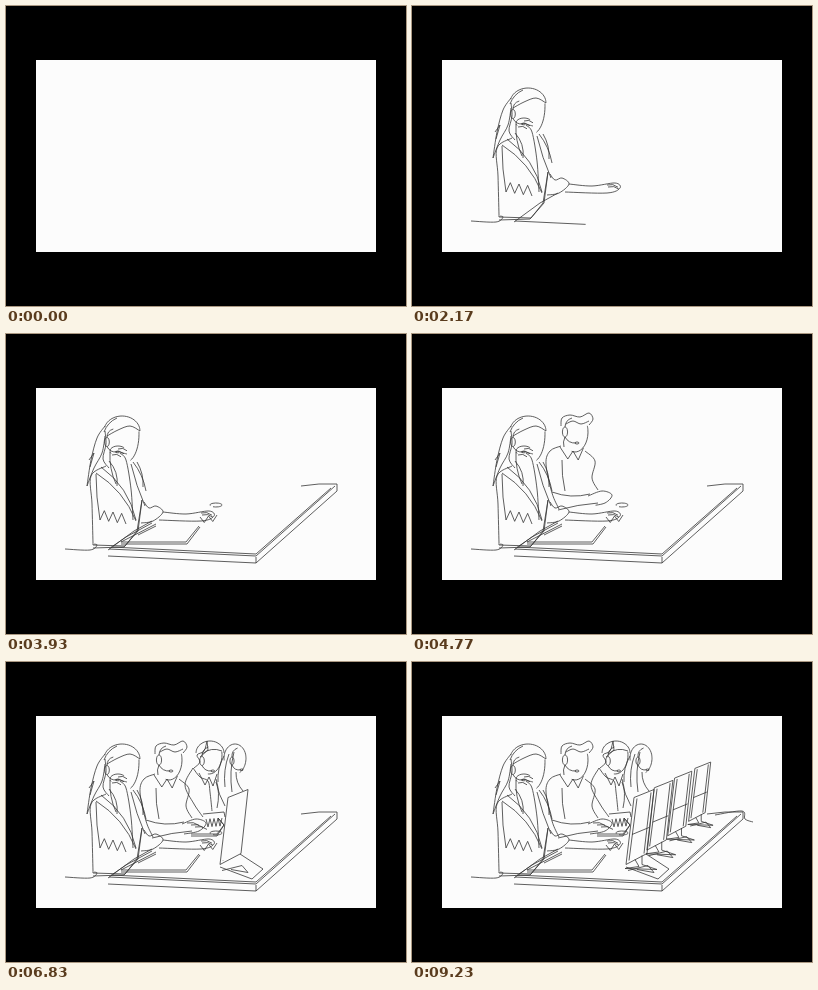
An HTML page for the animation above (9.93 s loop, 400x300 px).

```html
<!DOCTYPE html>
<html lang="en">
<head>
<meta charset="utf-8">
<title>One-line call centre</title>
<style>
  html, body { margin: 0; width: 100%; height: 100%; overflow: hidden; background: #000; }
  svg { display: block; width: 400px; height: 300px; }
  path { fill: none; stroke: #363636; stroke-width: .8; stroke-linejoin: round; }
</style>
</head>
<body>
<svg viewBox="0 0 400 300">
  <rect x="30" y="54" width="340" height="192" fill="#fcfcfc"/>
  <g id="ink"></g>
</svg>
<script>
const LOOP = 9930;
const ink = document.getElementById('ink');

const range = (n, f) => Array.from({ length: n }, (_, i) => f(i));
const pairs = n => range(n.length / 2, i => [n[2 * i], n[2 * i + 1]]);
const poly = (...n) => 'M' + pairs(n).join('L');

// Smooth curve through a few key points
function curve(...n) {
  const p = pairs(n);
  let d = 'M' + p[0];
  for (let i = 0; i < p.length - 1; i++) {
    const a = p[i - 1] || p[i], b = p[i], c = p[i + 1], e = p[i + 2] || c;
    const c1 = b.map((v, k) => v + (c[k] - a[k]) / 6);
    const c2 = c.map((v, k) => v - (e[k] - b[k]) / 6);
    d += `C${c1} ${c2} ${c}`;
  }
  return d;
}

// Single bow from one point to another, pushed sideways by b
const bend = (x1, y1, x2, y2, b) => {
  const len = Math.hypot(x2 - x1, y2 - y1);
  const mx = (x1 + x2) / 2 + 2 * b * (y2 - y1) / len;
  const my = (y1 + y2) / 2 - 2 * b * (x2 - x1) / len;
  return `M${x1},${y1}Q${mx},${my} ${x2},${y2}`;
};

// Part of an ellipse, in degrees clockwise from the right
const arc = (x, y, rx, ry, from, to) => curve(...range(13, i => {
  const a = (from + (to - from) * i / 12) * Math.PI / 180;
  return [x + rx * Math.cos(a), y + ry * Math.sin(a)];
}).flat());

const zigzag = (x1, y1, x2, y2, teeth, h) => poly(...range(2 * teeth + 1, i => {
  const k = i / (2 * teeth);
  return [x1 + (x2 - x1) * k, y1 + (y2 - y1) * k + (i % 2) * h];
}).flat());

// Ear cup, headband and microphone
const headset = (x, y, s, lift) => [
  arc(x, y, 2.6 * s, 5 * s, -90, 270),
  bend(x, y - 5 * s, x + 7 * s, y - lift, 2),
  bend(x, y + 5 * s, x + 11 * s, y + 11 * s, -2),
  arc(x + 12 * s, y + 11 * s, 2 * s, s, 0, 360)
];

const collar = (x, y, w) =>
  poly(x - w, y - 4, x - w * .4, y + 8, x, y, x + w * .4, y + 9, x + w * .8, y - 3);

const fingers = (x, y, n, dx, dy, len) =>
  range(n, i => bend(x + dx * i, y + dy * i, x + dx * i + len, y + dy * i + len * .2, 1.5));

// Draws the lines one after another at an even pen speed between two times
function draw(from, to, ...lines) {
  const paths = lines.flat().map(d => {
    const el = document.createElementNS('http://www.w3.org/2000/svg', 'path');
    el.setAttribute('d', d);
    ink.append(el);
    return el;
  });
  const lengths = paths.map(el => el.getTotalLength());
  const rate = (to - from) / lengths.reduce((a, b) => a + b);
  let t = from;
  paths.forEach((el, i) => {
    const end = t + lengths[i] * rate;
    const hidden = lengths[i] + 1;
    el.style.strokeDasharray = `${hidden} ${hidden * 2}`;
    el.animate([
      { strokeDashoffset: hidden, offset: 0 },
      { strokeDashoffset: hidden, offset: t / LOOP },
      { strokeDashoffset: 0, offset: end / LOOP },
      { strokeDashoffset: 0, offset: 1 }
    ], { duration: LOOP, iterations: Infinity });
    t = end;
  });
}

// First operator: vest, then hair, then raised arm
draw(30, 620,
  curve(59, 215, 84, 216, 91, 211, 86, 210),
  curve(87, 209, 86, 170, 85, 142, 100, 132),
  range(2, i => poly(87, 211 + 3 * i, 119 - i, 212 + i, 131 + i, 197, 136, 166)),
  bend(90, 139, 130, 187, 5),
  bend(90, 140, 94, 186, -1),
  zigzag(94, 186, 120, 190, 3, -10),
  bend(95, 133, 130, 186, 6));
draw(620, 1000,
  curve(103, 134, 97, 125, 100, 110, 99, 97),
  curve(99, 92, 91, 104, 85, 126, 81, 152),
  curve(81, 152, 88, 134, 96, 119, 99, 102),
  poly(83, 126, 88, 119, 84, 133),
  arc(116, 97, 18, 15, 195, 360),
  curve(134, 97, 124, 92, 112, 96, 101, 102),
  bend(98, 98, 111, 84, 2));
draw(1000, 1350,
  bend(103, 127, 111, 152, 3),
  curve(127, 186, 125, 155, 120, 126, 114, 119, 121, 120));

// Face, hand at the ear, far sleeve and forearm
draw(1370, 2000,
  arc(120, 100, 13, 28, -5, 70),
  headset(101, 108, .9, 13),
  arc(112, 117, 8, 5, 150, 320),
  fingers(106, 121, 3, 3, -3, 9),
  bend(104, 118, 110, 150, -2),
  range(2, i => bend(127 + 4 * i, 128, 140 - 3 * i, 157 - 4 * i, 2)),
  bend(125, 130, 139, 172, -1),
  curve(138, 168, 143, 174, 150, 172, 157, 178, 147, 187, 135, 189),
  curve(157, 178, 180, 180, 203, 177, 208, 182, 195, 187, 153, 186),
  fingers(195, 179, 2, 1, 2, 11));

// Desk: a slab given by three corners, with parallel rims
const rim = (inset, drop) =>
  poly(102 + inset, 216 - inset + drop, 250, 223 - inset + drop, 331 - 2 * inset, 151 + inset + drop);
draw(2030, 2660, poly(146, 187, 128, 197, 102, 216), rim(1, 0), rim(3, 0));
draw(2660, 3220,
  poly(107, 212, 120, 203, 146, 189),
  rim(0, 6),
  poly(250, 223, 250, 229),
  poly(331, 157, 331, 150),
  bend(331, 150, 295, 152, -1));
draw(3220, 3930,
  poly(150, 190, 115, 208, 180, 208, 193, 192),
  poly(115, 210, 181, 210, 194, 193),
  poly(132, 201, 150, 192),
  zigzag(194, 183, 211, 181, 2, 6),
  arc(210, 171, 6, 2, 160, 480));

// Second operator
draw(4030, 4480,
  curve(147, 175, 140, 159, 134, 130, 138, 117, 149, 112),
  collar(161, 117, 13),
  bend(153, 103, 152, 113, -1),
  curve(149, 92, 150, 84, 158, 81, 168, 83, 177, 79, 181, 85, 177, 91),
  curve(154, 90, 161, 87, 169, 90, 177, 87),
  arc(163, 98, 13, 20, -18, 105));
draw(4480, 5000,
  headset(153, 98, 1, 14),
  bend(150, 126, 153, 157, -1),
  curve(173, 117, 183, 127, 180, 144, 186, 156),
  bend(140, 158, 178, 160, -3),
  bend(146, 176, 186, 169, 1),
  curve(176, 162, 190, 157, 200, 161, 193, 169, 178, 172),
  fingers(181, 161, 3, 4, 2, 12),
  zigzag(200, 157, 216, 156, 4, 8),
  range(2, i => poly(185, 172 + 2 * i, 211, 172 + 2 * i, 218, 163, 212, 156)));

// Third operator
draw(5030, 5570,
  poly(197, 152, 218, 150, 219, 155),
  curve(197, 155, 188, 142, 179, 123, 187, 106),
  curve(187, 106, 194, 115, 202, 119, 204, 130, 206, 149),
  curve(188, 106, 194, 100, 191, 93, 198, 89, 201, 79),
  poly(201, 79, 202, 88, 194, 95));
draw(5570, 6020,
  arc(204, 91, 14, 12, 180, 360),
  bend(196, 92, 216, 89, 3),
  arc(203, 93, 13, 19, -10, 95),
  headset(196, 99, .9, 14),
  collar(203, 115, 10),
  bend(210, 117, 211, 146, 2));

// Fourth operator
draw(6020, 6400,
  arc(229, 96, 11, 14, 170, 360),
  arc(229, 96, 11, 16, 0, 65),
  range(3, i => bend(218 + 5 * i, 94 - 2 * i, 212 + 7 * i, 120 + 5 * i, -2)),
  headset(226, 99, .8, 13),
  bend(230, 110, 237, 129, -2),
  bend(210, 120, 219, 144, -1));

// Screens along the desk, each a smaller copy of the one before
function screen(i) {
  const x = 222 + 20.3 * i, y = 135.5 - 9.7 * i, s = 1 - .07 * i;
  const at = (...n) => poly(...n.map((v, k) => k % 2 ? y + v * s : x + v * s));
  return {
    panel: at(-8, 67, 0, 0, 20, -8, 13, 56, -8, 67),
    bezel: [
      at(-5, 63, 3, 1),
      at(17, -5, 10, 56),
      at(-2, 37, 15, 30)
    ],
    foot: [
      at(1, 62, 5, 69, -9, 71, 23, 72, 8, 67, 8, 58),
      at(-6, 73, 14, 68, 20, 75, 3, 72)
    ]
  };
}
const [near, second, third, far] = range(4, screen);
draw(6400, 6830, near.panel, poly(234, 192, 257, 207, 246, 217, 214, 205), near.foot[1]);
draw(6830, 7300, near.bezel, near.foot[0]);
draw(7300, 7670, second.panel, second.bezel, second.foot);
draw(7670, 8250, third.panel, third.bezel, third.foot);
draw(8250, 9000, far.panel, far.bezel);
draw(9000, 9230, far.foot, curve(303, 153, 330, 149, 333, 157, 341, 160));
</script>
</body>
</html>
```
